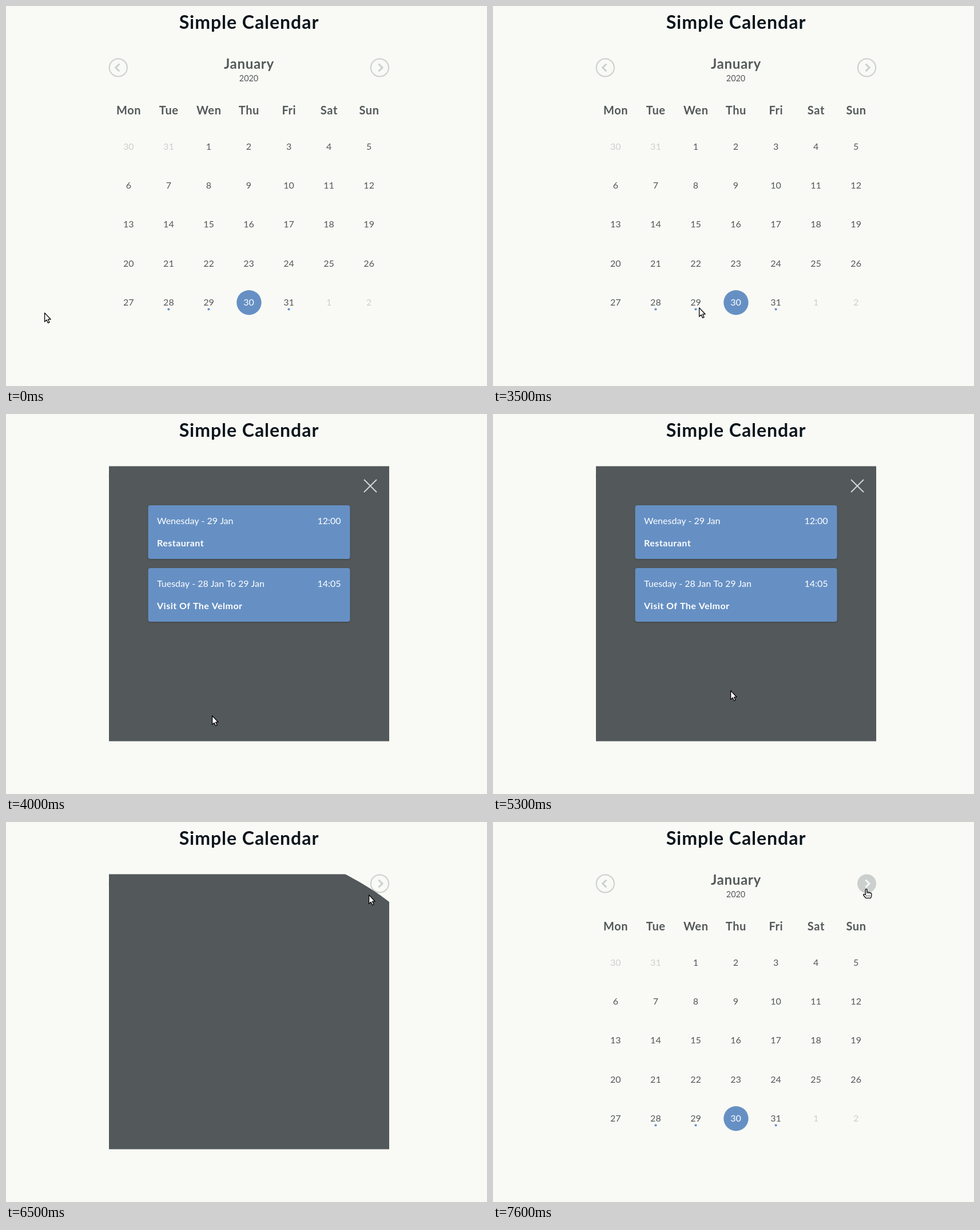
An HTML page with a canvas that plays this animation: 841x666 px, repeating every 8000 ms.

```html
<!DOCTYPE html>
<html lang="en">
<head>
<meta charset="utf-8">
<title>Simple Calendar</title>
<style>
  html, body { margin: 0; width: 100%; height: 100%; overflow: hidden; background: #f9faf5; }
  canvas { display: block; }
</style>
</head>
<body>
<canvas id="stage" width="841" height="666"></canvas>
<script>
const ctx = document.getElementById('stage').getContext('2d');
const LOOP = 8000, STEP = 100;
const BG = '#f9faf5', INK = '#0b151c', TEXT = '#53585a', PALE = '#cbcfce', BLUE = '#6690c4';
const PANEL = { x: 180, y: 91.5, w: 490, h: 482 };
const ORIGIN = { x: 361, y: 530 };
const OPEN = 3503, CLOSE = 6305, DURATION = 500;

// time, x, y of the pointer tip
const PATH = [
  [0, 67, 537], [400, 67, 537], [1300, 397, 459], [1400, 402, 457], [1900, 402, 457],
  [2000, 397, 457], [2100, 368, 446], [2200, 368, 446], [2600, 360, 528], [5200, 360, 528],
  [5300, 415, 484], [5400, 415, 484], [6000, 634, 127], [6700, 634, 127], [7100, 622, 166],
  [7400, 652, 120], [7500, 652, 120], [7600, 652, 117], [LOOP, 652, 117]
];
// time, hovered January day (0 = none)
const HOVER = [[0, 0], [1200, 22], [1300, 0], [1400, 23], [2000, 22], [2500, 29], [3500, 0]];

const clamp = v => Math.max(0, Math.min(1, v));
const smooth = u => u * u * (3 - 2 * u);
const colX = i => 424.5 + (i - 3) * 70.05;
const rowY = i => 519.5 - (4 - i) * 68.3;

// cubic-bezier(.42, 0, .58, 1)
function easeInOut(x) {
  let lo = 0, hi = 1;
  for (let i = 0; i < 24; i++) {
    const s = (lo + hi) / 2, r = 1 - s;
    if (1.26 * r * r * s + 1.74 * r * s * s + s * s * s < x) lo = s; else hi = s;
  }
  return smooth(lo);
}

function pointerAt(t) {
  const i = Math.max(1, PATH.findIndex(p => p[0] >= t));
  const [t0, x0, y0] = PATH[i - 1], [t1, x1, y1] = PATH[i];
  const u = smooth(clamp((t - t0) / (t1 - t0)));
  return { x: Math.round(x0 + (x1 - x0) * u), y: Math.round(y0 + (y1 - y0) * u) };
}

function write(str, x, y, size, color, { bold = false, align = 'center' } = {}) {
  const gap = bold ? size * 0.03 : 0;
  ctx.font = `${bold ? 700 : 400} ${size}px Lato, sans-serif`;
  ctx.letterSpacing = gap + 'px';
  ctx.textAlign = align;
  ctx.fillStyle = color;
  ctx.fillText(str, align === 'center' ? x + gap / 2 : x, y);
}

function disc(x, y, r, color) {
  ctx.beginPath();
  ctx.arc(x, y, r, 0, 2 * Math.PI);
  ctx.fillStyle = color;
  ctx.fill();
}

function ring(x, y, r, color) {
  ctx.beginPath();
  ctx.arc(x, y, r, 0, 2 * Math.PI);
  ctx.lineWidth = 2;
  ctx.strokeStyle = color;
  ctx.stroke();
}

function line(points, width, color) {
  ctx.beginPath();
  points.forEach(([x, y]) => ctx.lineTo(x, y));
  ctx.lineWidth = width;
  ctx.strokeStyle = color;
  ctx.stroke();
}

function arrowButton(x, dir, active) {
  const y = 108;
  if (active) disc(x, y, 16.5, PALE);
  else ring(x, y, 15.6, PALE);
  const c = x + dir;
  line([[c - 3 * dir, y - 6.5], [c + 3.5 * dir, y], [c - 3 * dir, y + 6.5]], 3, active ? BG : PALE);
}

function drawCalendar(t) {
  arrowButton(196.3, -1, false);
  arrowButton(653.5, 1, t >= 7400);
  write('January', 424.5, 110, 24, TEXT, { bold: true });
  write('2020', 424.5, 132, 14.4, TEXT);
  ['Mon', 'Tue', 'Wen', 'Thu', 'Fri', 'Sat', 'Sun'].forEach((name, i) =>
    write(name, colX(i), 190, 20, TEXT, { bold: true }));

  const hovered = HOVER.filter(h => h[0] <= t).pop()[1];
  for (let i = 0; i < 35; i++) {
    const day = i - 1, x = colX(i % 7), y = rowY(Math.floor(i / 7));
    const outside = day < 1 || day > 31;
    const label = day < 1 ? day + 31 : day > 31 ? day - 31 : day;
    const today = day === 30;
    if (today) disc(x + 0.4, y + 0.2, 21.7, BLUE);
    if (day > 0 && day === hovered) ring(x, y + 0.4, 20.6, BLUE);
    if ([28, 29, 31].includes(day)) disc(x, y + 12, 2.1, BLUE);
    write(String(label), x, Math.round(y + 5.3), 16, today ? '#fff' : outside ? PALE : TEXT);
  }
}

function drawCard(y, when, hour, title) {
  ctx.save();
  ctx.shadowColor = 'rgba(0,0,0,.25)';
  ctx.shadowBlur = 3;
  ctx.shadowOffsetY = 1;
  ctx.fillStyle = BLUE;
  ctx.beginPath();
  ctx.roundRect(248.5, y, 353, 94, 4);
  ctx.fill();
  ctx.restore();
  write(when, 264, y + 33, 16, '#fff', { align: 'left' });
  write(hour, 585.5, y + 33, 16, '#fff', { align: 'right' });
  write(title, 264, y + 72, 16, '#fff', { bold: true, align: 'left' });
}

function drawPanel(t) {
  const grow = easeInOut(clamp((t - OPEN) / DURATION));
  const shrink = easeInOut(clamp((t - CLOSE) / DURATION));
  const size = 1.5 * (grow - shrink);
  if (size <= 0.001) return;

  ctx.save();
  ctx.beginPath();
  ctx.rect(PANEL.x, PANEL.y, PANEL.w, PANEL.h);
  ctx.clip();
  ctx.beginPath();
  ctx.ellipse(ORIGIN.x, ORIGIN.y, PANEL.w * size, PANEL.h * size, 0, 0, 2 * Math.PI);
  ctx.fillStyle = TEXT;
  ctx.fill();
  ctx.clip();
  ctx.globalAlpha = clamp((t - 3850) / 140) * clamp((6420 - t) / 100);
  line([[626, 115], [648, 137]], 1.9, '#d3d6d6');
  line([[648, 115], [626, 137]], 1.9, '#d3d6d6');
  drawCard(160, 'Wenesday - 29 Jan', '12:00', 'Restaurant');
  drawCard(270, 'Tuesday - 28 Jan To 29 Jan', '14:05', 'Visit Of The Velmor');
  ctx.restore();
}

const ARROW = new Path2D('M.6 .9V16.4L4 13.1L6.5 18.6L9 17.5L6.6 12.2H11.2Z');
const HAND = new Path2D('M-.8 9.8V2Q-.8 .6 .6 .6T2 2V6.2Q4 5.3 4.8 6.7Q6.6 5.9 7.3 7.2Q9.7 6.8 9.8 9V12Q9.5 14 8.4 16.3H-.4Q-1.4 14-3.6 12.4Q-5 10.8-3.7 9.6Q-2.5 9-.8 10.8Z');
const KNUCKLES = new Path2D('M2 6.2V9M4.8 6.8V9M7.4 7.3V9.2M1.5 11V14M4.2 11V14M6.8 11V14');

function drawPointer(t) {
  const { x, y } = pointerAt(t);
  const hand = (t >= 1400 && t < 3500) || t >= 7400;
  ctx.save();
  ctx.translate(x, y);
  ctx.lineJoin = 'round';
  ctx.fillStyle = '#fff';
  ctx.strokeStyle = '#000';
  ctx.lineWidth = 1.3;
  ctx.fill(hand ? HAND : ARROW);
  ctx.stroke(hand ? HAND : ARROW);
  if (hand) {
    ctx.lineWidth = 0.7;
    ctx.stroke(KNUCKLES);
  }
  ctx.restore();
}

function draw(t) {
  ctx.fillStyle = BG;
  ctx.fillRect(0, 0, 841, 666);
  write('Simple Calendar', 424.5, 40, 32, INK, { bold: true });
  drawCalendar(t);
  drawPanel(t);
  drawPointer(t);
}

const start = performance.now();
function tick() {
  const t = (performance.now() - start) % LOOP;
  draw(Math.floor(t / STEP) * STEP);
  requestAnimationFrame(tick);
}
tick();
</script>
</body>
</html>
```
